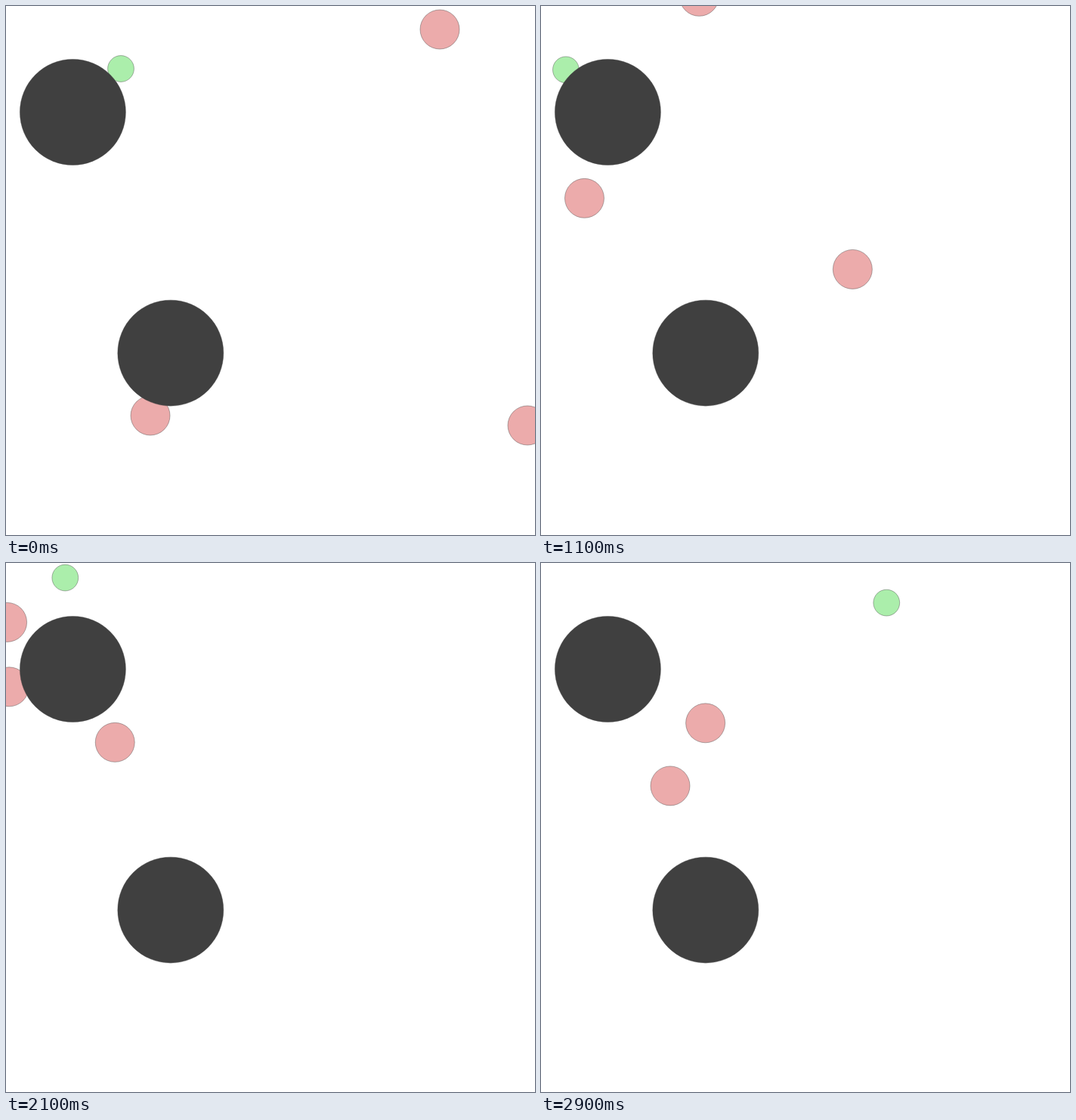
Write an HTML page with a canvas that moves like this. It is 700 px wide and 700 px high and loops after 3 s.

```html
<!DOCTYPE html>
<html lang="en">
<head>
<meta charset="utf-8">
<title>Chase around obstacles</title>
<style>
  html, body { margin: 0; width: 100%; height: 100%; overflow: hidden; background: #fff; }
  canvas { display: block; width: 700px; height: 700px; }
</style>
</head>
<body>
<canvas id="stage" width="700" height="700"></canvas>
<script>
const ctx = document.getElementById('stage').getContext('2d');
const LOOP = 3000;
const TICK = 100;
const BEAT = 500;

const RED = { radius: 26, fill: '#ecabab' };
const GREEN = { radius: 17.4, fill: '#abeeab' };
const DARK = { radius: 70, fill: '#404040' };

const obstacles = [[88.4, 140.5], [217.8, 459.2]];

// Each route is a smooth curve through one point per beat.
const agents = [
  route(RED, [574, 31], [421, -4], [244, -19], [82, 40], [0, 143], [75, 243], [200, 304]),
  route(RED, [191, 542], [102, 465], [67, 281], [17, 175], [-3, 97], [42, 0], [103, -72]),
  route(RED, [690, 555], [585, 473], [442, 368], [293, 279], [160, 237], [126, 251], [257, 195]),
  route(GREEN, [152, 83], [82, 57], [49, 81], [-35, 86], [40, 22], [283, 35], [498, 58])
];

// The ends are continued as parabolas, so the curve needs no special case there.
function route(style, ...points) {
  const extend = (a, b, c) => a.map((v, axis) => 3 * (v - b[axis]) + c[axis]);
  const path = [
    extend(...points.slice(0, 3)),
    ...points,
    extend(...points.slice(-3).reverse())
  ];
  return { style, path };
}

// Catmull-Rom interpolation.
function pointOn(path, time) {
  const beat = Math.floor(time / BEAT);
  const u = time / BEAT - beat;
  const [a, b, c, d] = path.slice(beat, beat + 4);
  return b.map((v, axis) => {
    const enter = (c[axis] - a[axis]) / 2;
    const leave = (d[axis] - v) / 2;
    const ease = u * u * (3 - 2 * u);
    return v + (c[axis] - v) * ease + u * (1 - u) * (enter * (1 - u) - leave * u);
  });
}

function disc([x, y], { radius, fill }) {
  ctx.beginPath();
  ctx.arc(x, y, radius, 0, Math.PI * 2);
  ctx.fillStyle = fill;
  ctx.fill();
  ctx.stroke();
}

function draw(elapsed) {
  const time = Math.floor((elapsed % LOOP) / TICK) * TICK;
  ctx.clearRect(0, 0, 700, 700);
  ctx.strokeStyle = 'rgba(64, 64, 64, 0.4)';
  for (const { style, path } of agents) disc(pointOn(path, time), style);
  for (const center of obstacles) disc(center, DARK);
}

let start;
function frame(now) {
  start ??= now;
  draw(now - start);
  requestAnimationFrame(frame);
}
draw(0);
requestAnimationFrame(frame);
</script>
</body>
</html>
```
